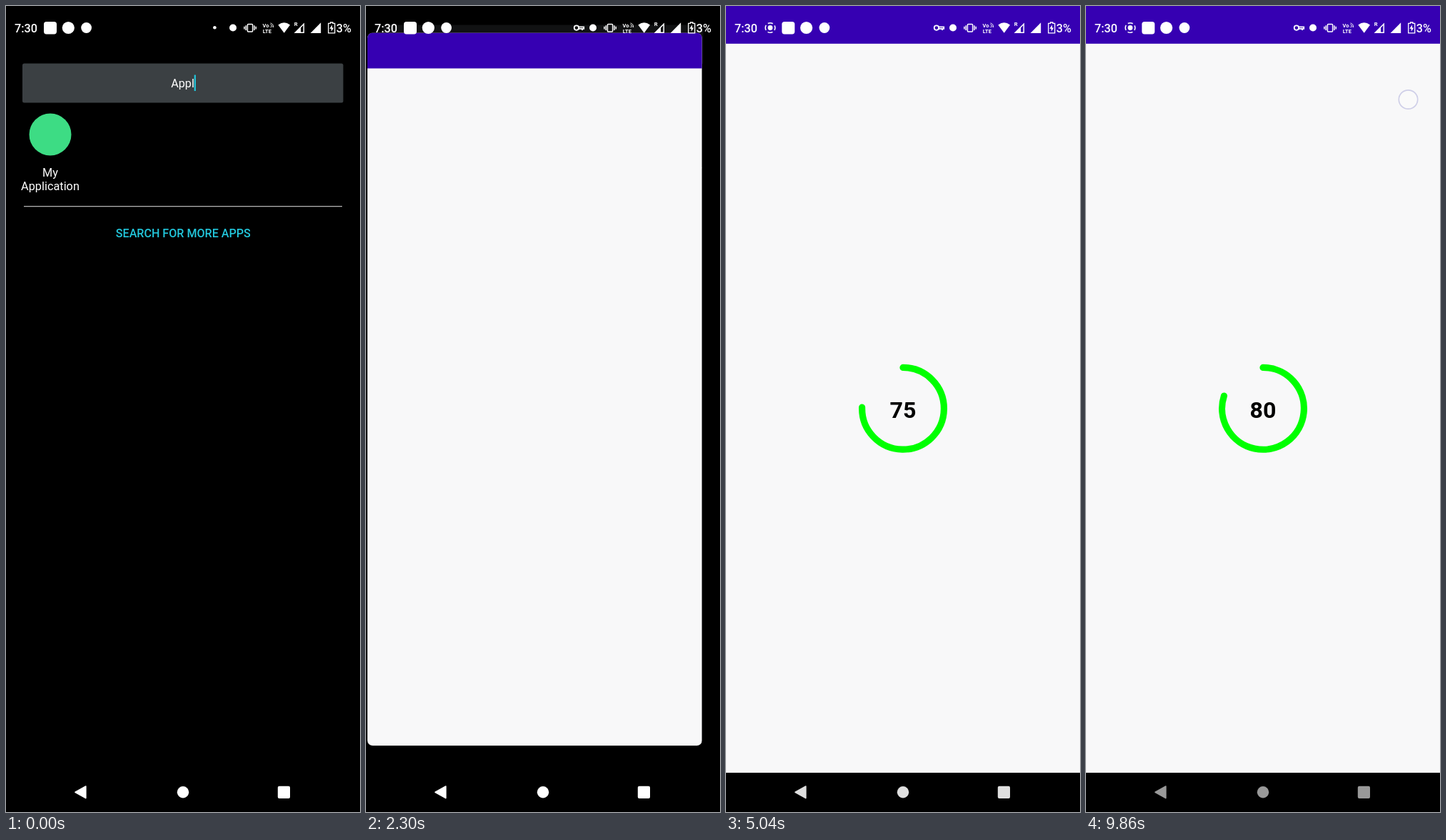
These frames come from a looping animation (496x1129 px, 9960 ms). An HTML page:

```html
<!DOCTYPE html>
<html lang="en">
<head>
<meta charset="utf-8">
<title>Circular progress</title>
<style>
html, body { margin: 0; width: 100%; height: 100%; overflow: hidden; background: #000; }
svg { display: block; width: 496px; height: 1129px; font-family: Roboto, sans-serif; }
.mid { text-anchor: middle; }
.med { font-weight: 500; }
</style>
</head>
<body>
<svg viewBox="0 0 496 1129">
  <defs>
    <clipPath id="clip"><rect id="clipBox"/></clipPath>
  </defs>
  <rect width="496" height="1129"/>

  <g id="search" fill="#fff" font-size="16.3">
    <rect x="23" y="80.5" width="449.5" height="55" rx="2.5" fill="#3b4043"/>
    <text class="mid" x="247.5" y="114" font-size="16.2">Appl</text>
    <rect id="cursor" x="263.7" y="96.5" width="2.2" height="22.5" fill="#22c7dc"/>
    <circle id="icon" cx="62" cy="180" r="29.5" fill="#3ddc84"/>
    <text class="mid" x="62" y="239">My</text>
    <text class="mid" x="62" y="258.3">Application</text>
    <rect x="25" y="280" width="446" height="1.3" fill="#b0b0b0"/>
    <text class="mid med" x="248.3" y="324" font-size="16.1" fill="#22c7dc">SEARCH FOR MORE APPS</text>
  </g>

  <g id="app" clip-path="url(#clip)">
    <g id="page">
      <rect width="496" height="1129" fill="#f8f8f9"/>
      <rect width="496" height="52.8" fill="#3600b2"/>
      <g id="content">
        <path id="ring" fill="none" stroke="#0f0" stroke-width="9.2" stroke-linecap="round"/>
        <text id="count" class="mid" x="248" y="576.5" font-size="32.2" font-weight="700">0</text>
      </g>
    </g>
  </g>

  <rect y="1074" width="496" height="55"/>
  <g id="nav" fill="#fff" stroke-linejoin="round">
    <path d="M97 1101.3L111.8 1093V1109.6Z" stroke="#fff" stroke-width="1.6"/>
    <circle cx="248" cy="1101.3" r="8.2"/>
    <rect x="380.8" y="1092.8" width="17.2" height="17.2" rx="2"/>
  </g>

  <g fill="#fff" stroke="none">
    <text class="med" x="12" y="36.8" font-size="16.2">7:30</text>
    <g id="cast" fill="none" stroke="#fff" stroke-width="1.6">
      <circle cx="62" cy="30.5" r="3.4" fill="#fff" stroke="none"/>
      <circle cx="62" cy="30.5" r="6.8" stroke-dasharray="7.2 3.48" stroke-dashoffset="3.6"/>
    </g>
    <g id="notes">
      <rect x="53" y="22" width="18" height="17.4" rx="3.6"/>
      <circle cx="87.3" cy="30.5" r="8.6"/>
      <circle cx="112.6" cy="30.5" r="7.4"/>
    </g>
    <circle id="dot" cx="292.4" cy="30.3" r="2.3"/>
    <g id="key" fill="none" stroke="#fff" stroke-width="1.8">
      <circle cx="294.9" cy="30.6" r="3.2"/>
      <path d="M298 29.4H305.2V31.8H298M303 31.8V34"/>
    </g>
    <circle cx="318" cy="30.5" r="5"/>
    <g fill="none" stroke="#fff" stroke-width="1.5">
      <rect x="338.4" y="25.4" width="7.2" height="10.6" rx="1"/>
      <path d="M336.2 27.3V34M333.9 28.8V32.6M347.9 27.3V34M350.2 28.8V32.6"/>
    </g>
    <text x="359.6" y="29.6" font-size="7.4" font-weight="700">Vo</text>
    <path d="M370 28.6l1.5 1.5M370.5 25.8a4 4 0 0 1 2.3 3.8M370.6 23.9a6 6 0 0 1 4 6" fill="none" stroke="#fff"/>
    <text x="359.8" y="38" font-size="7.4" font-weight="700">LTE</text>
    <path d="M381.3 26.6Q389.7 20 398 26.6L389.7 37.8Z"/>
    <text x="403.7" y="27.6" font-size="7.6" font-weight="700">R</text>
    <path d="M405.4 37.2H417.2V25.3Z" fill="none" stroke="#fff" stroke-width="1.5"/>
    <path d="M404 38H413V29.2Z"/>
    <path d="M426.6 38H441.2V23.2Z"/>
    <path d="M454.5 23h3.4v1.4h2.8v13.4h-9v-13.4h2.8z" fill="none" stroke="#fff" stroke-width="1.3"/>
    <path d="M457 26.4L453.3 31.8H455.7V35.8L459.2 30.4H457Z"/>
    <text class="med" x="462.8" y="36.8" font-size="16.2">3%</text>
  </g>

  <circle id="press" cx="79" cy="181" r="13" fill="#dfe6ee" stroke="#c9cce6" stroke-width="1.4"/>
  <circle id="press2" cx="451.5" cy="131" r="13.2" fill="#fafafa" stroke="#cfcfe8" stroke-width="1.7"/>
</svg>
<script>
const LOOP = 9960, OPEN = 1880, COUNT = 2555, COUNT_MS = 3500, GOAL = 0.8;
const el = {};
document.querySelectorAll('[id]').forEach(e => el[e.id] = e);

const clamp = v => Math.max(0, Math.min(1, v));
const ramp = (t, a, b) => clamp((t - a) / (b - a));
const mix = (a, b, k) => a + (b - a) * k;
const set = (e, attrs) => { for (const k in attrs) e.setAttribute(k, attrs[k]); };
const fade = (e, a) => set(e, { opacity: a });

// cubic-bezier(0.4, 0, 0.2, 1)
function fastOutSlowIn(x) {
  let lo = 0, hi = 1;
  for (let i = 0; i < 24; i++) {
    const s = (lo + hi) / 2, r = 1 - s;
    if (1.2 * r * r * s + 0.6 * r * s * s + s * s * s < x) lo = s; else hi = s;
  }
  return lo * lo * (3 - 2 * lo);
}

function drawWindow(t) {
  const age = t - OPEN;
  const p = age <= 0 ? 0 : t >= 2950 ? 1 : 1 - Math.exp(-Math.pow(age / 128, 0.857));
  const w = mix(60, 496, p), h = mix(60, 1074, Math.pow(p, 1.2));
  const x = mix(62, 248, p) - w / 2;
  const y = mix(180, 537, 1 - Math.pow(1 - p, 2.7)) - h / 2;
  set(el.clipBox, { x, y, width: w, height: h, rx: Math.min(w / 2, h / 2, 118 * (1 - p)) });
  set(el.page, { transform: `translate(${x} ${y}) scale(${w / 496})` });
  fade(el.app, ramp(age, 0, 60));
  set(el.search, { transform: `translate(0 ${-57.5 * p})`, opacity: p === 1 ? 0 : 1 - 0.76 * p });
}

function drawProgress(t) {
  const v = GOAL * fastOutSlowIn(ramp(t, COUNT, COUNT + COUNT_MS));
  const a = v * 2 * Math.PI, r = 57.4;
  const x = 248 + r * Math.sin(a), y = 563.8 - r * Math.cos(a);
  set(el.ring, { d: `M248 ${563.8 - r}A${r} ${r} 0 ${v > 0.5 ? 1 : 0} 1 ${x + 0.01} ${y}` });
  el.count.textContent = Math.floor(v * 100 + 1e-4);
  fade(el.content, ramp(t, 2500, 2813));
}

function drawStatus(t) {
  const k = 1 - Math.pow(1 - ramp(t, 2520, 2860), 4);
  set(el.notes, { transform: `translate(${25.3 * k} 0)` });
  fade(el.cast, ramp(t, 2600, 2820));
  const keyed = t >= 400 ? 1 : 0;
  fade(el.dot, 1 - keyed);
  fade(el.key, keyed);
  const dim = t < 5040 ? mix(1, 0.875, ramp(t, 4100, 5040))
    : t < 7040 ? mix(0.875, 0.635, ramp(t, 5040, 7040))
    : mix(0.635, 0.6, ramp(t, 7040, 8220));
  fade(el.nav, dim);
}

function drawTouch(t) {
  fade(el.cursor, t < 1500 && t % 1000 < 500 ? 1 : 0);
  set(el.icon, { r: mix(29.5, 30.4, ramp(t, 1440, 1540)) });
  fade(el.press, t < 1440 ? 0 : 0.5 * (1 - ramp(t, 1900, 2080)));
  fade(el.press2, t >= 9680 ? 1 : 0);
}

function frame() {
  const t = performance.now() % LOOP;
  drawWindow(t);
  drawProgress(t);
  drawStatus(t);
  drawTouch(t);
  requestAnimationFrame(frame);
}
frame();
</script>
</body>
</html>
```
